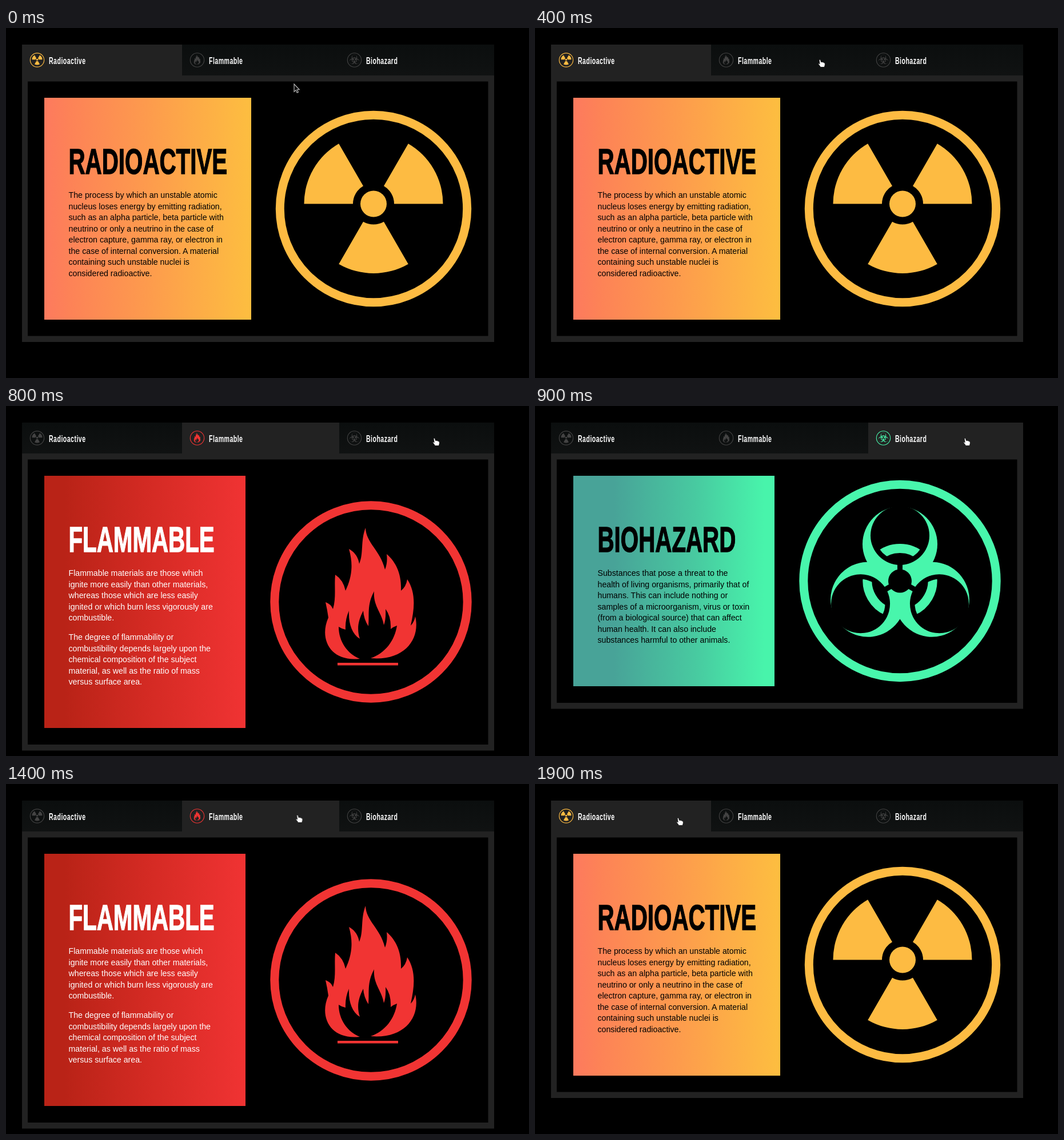
Write an HTML page that moves like this. It is 915 px wide and 612 px high and loops after 2 s.

```html
<!DOCTYPE html>
<html lang="en">
<head>
<meta charset="utf-8">
<title>Hazard tabs</title>
<style>
  html, body { margin: 0; width: 100%; height: 100%; overflow: hidden; background: #000; }
  svg { display: block; width: 915px; height: 612px; }
  text { font-family: "Liberation Sans", Arial, sans-serif; }
  .title, .label { font-weight: 700; }
  .title { font-size: 63px; stroke: currentColor; stroke-width: 1.4px; }
  .label { font-size: 16.5px; letter-spacing: .75px; fill: #fff; }
  .body { font-size: 14.2px; }

  .panel, .cursor, .arrow, .hand { animation: 2s step-end infinite; }
  .radioactive { animation-name: radioactive; }
  .flammable { animation-name: flammable; }
  .biohazard { animation-name: biohazard; }
  .cursor { animation-name: travel; }
  .arrow { animation-name: arrow; }
  .hand { animation-name: hand; }

  @keyframes radioactive { 0%, 95%, 100% { opacity: 1 } 25% { opacity: 0 } }
  @keyframes flammable { 0%, 45%, 95%, 100% { opacity: 0 } 25%, 70% { opacity: 1 } }
  @keyframes biohazard { 0%, 70%, 100% { opacity: 0 } 45% { opacity: 1 } }
  @keyframes arrow { 0% { opacity: 1 } 10%, 100% { opacity: 0 } }
  @keyframes hand { 0% { opacity: 0 } 10%, 100% { opacity: 1 } }
  @keyframes travel {
    0% { transform: translate(504px, 98px); animation-timing-function: steps(4) }
    20%, 25% { transform: translate(501px, 62px) }
    30% { transform: translate(545px, 61px); animation-timing-function: steps(2) }
    40% { transform: translate(752px, 63px) }
    45%, 50% { transform: translate(755px, 63px) }
    55% { transform: translate(715px, 62px); animation-timing-function: steps(2) }
    65%, 70% { transform: translate(512.5px, 61px) }
    75% { transform: translate(480px, 62px); animation-timing-function: steps(2) }
    85% { transform: translate(285px, 64px) }
    90% { transform: translate(254px, 65px) }
    95%, 100% { transform: translate(253px, 66px) }
  }
</style>
</head>
<body>
<svg viewBox="0 0 915 612">
  <defs>
    <linearGradient id="tab" x2="0" y2="1">
      <stop stop-color="#0b0e0e"/><stop offset="1" stop-color="#101212"/>
    </linearGradient>
    <path id="blade" d="M-36 0H-121.5A121.5 121.5 0 0 1 -60.75 -105.2L-18 -31.2A36 36 0 0 0 -36 0Z"/>
    <g id="icon-radioactive">
      <circle r="163.7" fill="none" stroke="currentColor" stroke-width="15"/>
      <g transform="translate(0 -8.5)" fill="currentColor">
        <circle r="23"/>
        <use href="#blade"/>
        <use href="#blade" transform="rotate(120)"/>
        <use href="#blade" transform="rotate(240)"/>
      </g>
    </g>
    <g id="icon-flammable">
      <circle r="168.7" fill="none" stroke="currentColor" stroke-width="15"/>
      <g transform="translate(-638.5 -342.5)" fill="currentColor">
        <path d="M629 213C630 240 655 252 663 286Q668 274 666 259C685 275 692 298 691 323
          Q700 316 702 303C716 324 716 350 708 384Q714 378 716 368C725 405 700 446 638 441
          C664 432 680 410 684 384Q678 386 673 390Q674 368 664 355Q665 373 661 383
          C658 362 642 350 644 324C631 348 636 365 634 385Q626 373 625 358C617 374 613 388 619 407
          C605 398 599 380 600 358Q593 374 594 391Q588 390 582 386C582 412 598 434 619 442
          C568 448 547 408 564 370Q562 356 559 343Q568 346 572 355C578 335 574 315 576 295
          Q590 304 594 323C605 300 608 277 600 250Q615 258 618 276C626 258 620 236 629 213Z"/>
        <rect x="580" y="449" width="106" height="4.5"/>
      </g>
    </g>
    <clipPath id="lobe"><circle cy="-79.6" r="43"/></clipPath>
    <circle id="outer" cy="-64.5" r="65.5"/>
    <g id="inner">
      <circle cy="-79.6" r="51.5" fill="#000"/>
      <rect x="-4.5" y="-40" width="9" height="40" fill="#000"/>
      <circle r="57" fill="none" stroke="#fff" stroke-width="16" clip-path="url(#lobe)"/>
    </g>
    <mask id="trefoil" maskUnits="userSpaceOnUse" x="-180" y="-180" width="360" height="360">
      <g fill="#fff">
        <use href="#outer"/>
        <use href="#outer" transform="rotate(120)"/>
        <use href="#outer" transform="rotate(240)"/>
      </g>
      <use href="#inner"/>
      <use href="#inner" transform="rotate(120)"/>
      <use href="#inner" transform="rotate(240)"/>
      <circle r="20.5"/>
    </mask>
    <g id="icon-biohazard">
      <circle r="168.7" fill="none" stroke="currentColor" stroke-width="15"/>
      <rect x="-150" y="-150" width="300" height="300" fill="currentColor" mask="url(#trefoil)"/>
    </g>
  </defs>
  <rect width="915" height="612"/>
  <g id="stage"></g>
  <g class="cursor">
    <path class="arrow" d="M0 0V13.5L3.1 10.7L5.2 15.2L7.4 14.2L5.4 9.8H9.3Z" fill="#111" stroke="#bbb" stroke-width="1.1"/>
    <path class="hand" d="M-4 -6C-3 -7.3 -1.8 -6.6 -1.4 -5.4L-.4 -2.2C.6 -3.2 1.8 -2.8 2.2 -1.9
      C3.2 -2.6 4.2 -2 4.5 -1.1C5.6 -1.4 6.2 -.6 6.3 .6C6.5 3 5.8 4.6 5.2 6.5H-1.4
      C-2.2 4.4 -4.2 3 -5.2 1.1C-5.6 -.1 -4.3 -.6 -2.8 .8Z" fill="#fff" stroke="#111" stroke-width=".9"/>
  </g>
</svg>
<script>
  const LINE = 19.57;
  const SQUEEZE = 0.64; // condensed face shared by titles and labels

  const hazards = [
    {
      name: 'Radioactive', tab: [28, 308], bottom: 549, card: [429, 510], icon: [643, 316, 171],
      color: '#fdbb42', ink: '#000', stops: [[0, '#fd7a5e'], [.12, '#fd8257'], [.5, '#fd9b4d'], [1, '#fdbe40']],
      paragraphs: [[297, [
        'The process by which an unstable atomic',
        'nucleus loses energy by emitting radiation,',
        'such as an alpha particle, beta particle with',
        'neutrino or only a neutrino in the case of',
        'electron capture, gamma ray, or electron in',
        'the case of internal conversion. A material',
        'containing such unstable nuclei is',
        'considered radioactive.']]]
    },
    {
      name: 'Flammable', tab: [308, 583], bottom: 602.5, card: [419, 563], icon: [638.5, 342.5, 176],
      color: '#f13433', ink: '#fff', stops: [[.1, '#b92317'], [.5, '#d32a23'], [1, '#f03333']],
      paragraphs: [[297, [
        'Flammable materials are those which',
        'ignite more easily than other materials,',
        'whereas those which are less easily',
        'ignited or which burn less vigorously are',
        'combustible.']], [409, [
        'The degree of flammability or',
        'combustibility depends largely upon the',
        'chemical composition of the subject',
        'material, as well as the ratio of mass',
        'versus surface area.']]]
    },
    {
      name: 'Biohazard', tab: [583, 854], bottom: 529.5, card: [419, 490], icon: [638.5, 306, 176],
      color: '#48f6ac', ink: '#000', stops: [[.2, '#48a398'], [.6, '#48c9a0'], [.95, '#48f4ab']],
      paragraphs: [[297, [
        'Substances that pose a threat to the',
        'health of living organisms, primarily that of',
        'humans. This can include nothing or',
        'samples of a microorganism, virus or toxin',
        '(from a biological source) that can affect',
        'human health. It can also include',
        'substances harmful to other animals.']]]
    }
  ];

  const rect = (x1, y1, x2, y2, fill) =>
    `<rect x="${x1}" y="${y1}" width="${x2 - x1}" height="${y2 - y1}" fill="${fill}"/>`;

  const icon = (id, x, y, scale, color) =>
    `<use href="#icon-${id}" transform="translate(${x} ${y}) scale(${scale})" color="${color}"/>`;

  const condensed = (kind, x, y, text) =>
    `<text class="${kind}" transform="translate(${x} ${y}) scale(${SQUEEZE} 1)">${text}</text>`;

  const paragraph = ([top, lines]) => lines.map((line, i) =>
    `<text class="body" x="109.5" y="${top + i * LINE}">${line}</text>`).join('');

  const tabIcon = (h, color) =>
    icon(h.name.toLowerCase(), h.tab[0] + 26.5, 56, 12.7 / h.icon[2], color);

  function panel(h) {
    const id = h.name.toLowerCase();
    const [x, y] = h.icon;
    const stops = h.stops.map(([at, color]) => `<stop offset="${at}" stop-color="${color}"/>`).join('');
    return `<g class="panel ${id}">
      <linearGradient id="fill-${id}">${stops}</linearGradient>
      ${rect(28, 83, 854, h.bottom, '#222')}
      ${rect(h.tab[0], 29, h.tab[1], 83.5, '#222')}
      ${rect(38, 93.5, 843.5, h.bottom - 10.5, '#000')}
      ${rect(67, 122, h.card[0], h.card[1], `url(#fill-${id})`)}
      <g fill="${h.ink}" color="${h.ink}">
        ${condensed('title', 109.5, 255, h.name.toUpperCase())}
        ${h.paragraphs.map(paragraph).join('')}
      </g>
      ${icon(id, x, y, 1, h.color)}
      ${tabIcon(h, h.color)}
    </g>`;
  }

  document.getElementById('stage').innerHTML =
    rect(28, 29, 854, 83, 'url(#tab)') +
    hazards.map(h => tabIcon(h, '#434343')).join('') +
    hazards.map(panel).join('') +
    hazards.map(h => condensed('label', h.tab[0] + 47, 62.5, h.name)).join('');
</script>
</body>
</html>
```
